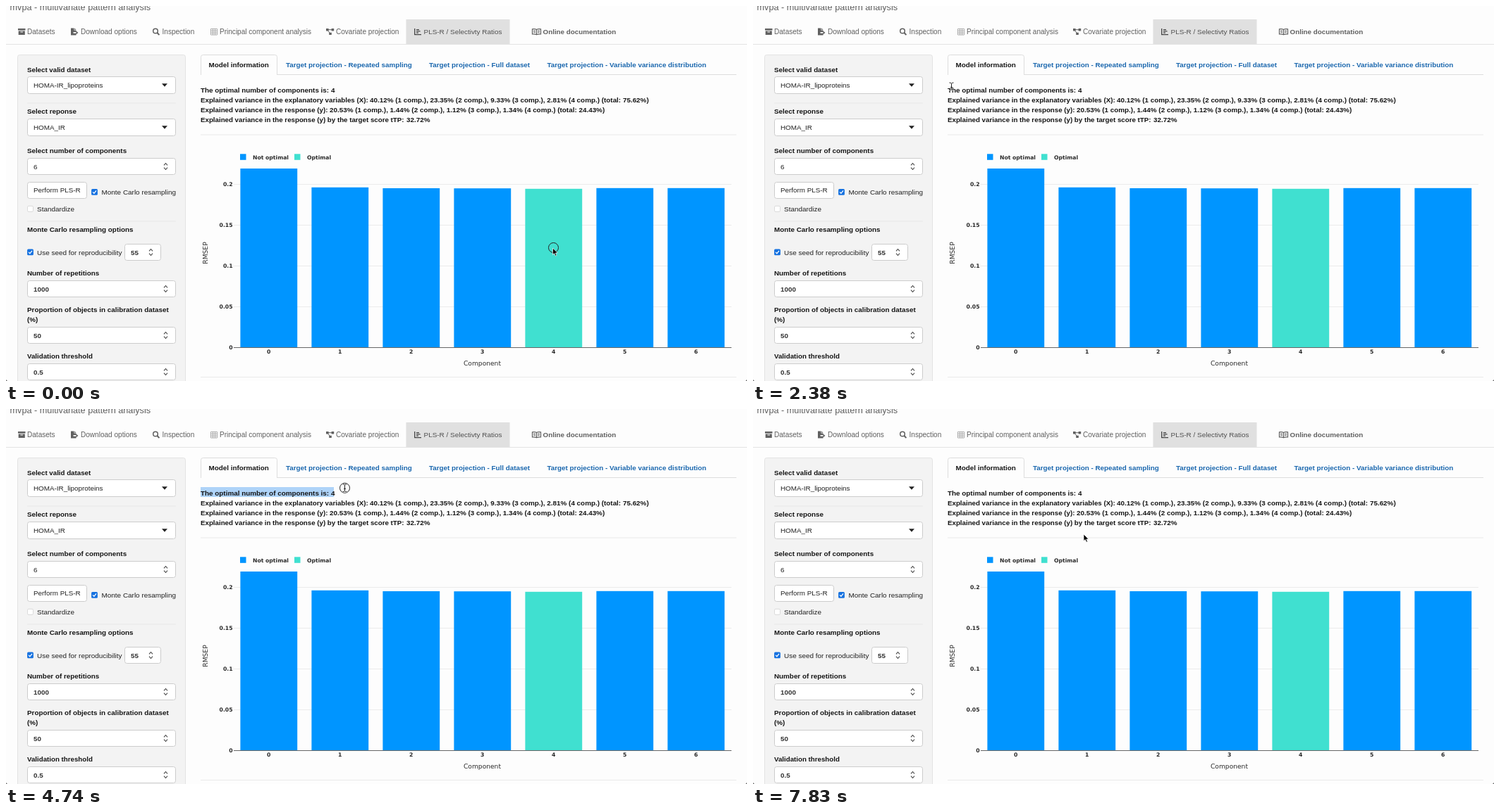
These frames come from a looping animation (1051 by 533 pixels, 8000 ms). An HTML page:

```html
<!DOCTYPE html>
<html lang="en">
<head>
<meta charset="utf-8">
<title>Pattern analysis</title>
<style>
html, body { margin: 0; width: 100%; height: 100%; overflow: hidden; background: #fdfdfd; }
svg { display: block; width: 100%; height: 100%; }
text { font-family: "Liberation Sans", Arial, sans-serif; font-size: 9.85px; fill: #222; white-space: pre; }
.b { font-weight: bold; fill: #161616; }
.value { font-weight: bold; fill: #333; }
.words { font-size: 9.72px; }
.figures { font-size: 9.9px; }
.wide { font-size: 9.95px; }
.nav { font-size: 10.05px; fill: #606060; }
.link { font-weight: bold; fill: #1a67ae; }
.plot { font-family: "DejaVu Sans", sans-serif; font-size: 7.7px; font-weight: bold; fill: #2a2a2a; }
.axis { font-family: "DejaVu Sans", sans-serif; font-size: 9.15px; fill: #2a2a2a; }
.icon { fill: #606060; stroke: none; }
.line { fill: none; stroke: #606060; stroke-width: 1; }
</style>
</head>
<body>
<svg viewBox="0 0 1051 533" xmlns="http://www.w3.org/2000/svg">
  <g id="page"></g>
  <rect id="mark" x="276" y="111" height="14" fill="#aed3f8"/>
  <g id="info"></g>
  <g id="pointer">
    <circle id="ring" r="7" fill="none" stroke="#222" stroke-width="1"/>
    <path id="arrow" d="M0 0V9.6L2.2 7.6L3.8 11.2L5.5 10.4L3.9 7H7Z" fill="#000" stroke="#fff" stroke-width=".7" stroke-linejoin="round"/>
    <g id="beam" fill="none">
      <path d="M-3-5.5Q0-5.5 0-4Q0-5.5 3-5.5M0-4V4M-3 5.5Q0 5.5 0 4Q0 5.5 3 5.5M-1.5 1H1.5" stroke="#fff" stroke-width="2"/>
      <path d="M-3-5.5Q0-5.5 0-4Q0-5.5 3-5.5M0-4V4M-3 5.5Q0 5.5 0 4Q0 5.5 3 5.5M-1.5 1H1.5" stroke="#222" stroke-width="1"/>
    </g>
  </g>
</svg>
<script>
const el = id => document.getElementById(id);
const text = (x, y, s, cls = "", more = "") => `<text x="${x}" y="${y}" class="${cls}" ${more}>${s}</text>`;
const rect = (x, y, w, h, fill, more = "") => `<rect x="${x}" y="${y}" width="${w}" height="${h}" fill="${fill}" ${more}/>`;
const path = (d, cls = "icon", more = "") => `<path d="${d}" class="${cls}" ${more}/>`;
const rule = (x, y, x2, color) => rect(x, y, x2 - x, 1, color);

const box = (x, y, w, h) => rect(x + .5, y + .5, w - 1, h - 1, "#fff", 'rx="3" stroke="#ccc"');
const spin = (x, y) => `<path d="M${x - 2.5} ${y - 1.7}l2.5-2.8l2.5 2.8M${x - 2.5} ${y + 1.7}l2.5 2.8l2.5-2.8" fill="none" stroke="#444" stroke-width="1.1"/>`;
const check = (x, y, on) => on
  ? rect(x - 4.4, y - 4.4, 8.8, 8.8, "#1672e0", 'rx="1.5"') +
    `<path d="M${x - 2.4} ${y + .1}l1.8 1.9l3.1-4" fill="none" stroke="#fff" stroke-width="1.3"/>`
  : rect(x - 4, y - 4, 8, 8, "#fff", 'rx="1.5" stroke="#d2d2d2" stroke-width=".8"');
const select = (y, s) => box(30, y, 211, 25) + text(39, y + 15.6, s) +
  path(`M221 ${y + 10.3}h8l-4 4.4z`, "", 'fill="#222"');
const number = (y, s, cls = "value", x = 30, w = 211) =>
  box(x, y, w, 24) + text(x + 9, y + 15.5, s, cls) + spin(x + w - 14.5, y + 12);

function navBar() {
  let s = text(5.5, 5.7, "mvpa - multivariate pattern analysis", "nav", 'style="font-size:12.7px"');
  s += rule(0, 54, 1051, "#e4e4e4") + rect(567.5, 19, 147, 35, "#e0e0e0");
  [[30, "Datasets"], [106, "Download options"], [221.5, "Inspection"],
   [303, "Principal component analysis"], [468, "Covariate projection"]]
    .forEach(([x, label]) => s += text(x, 40.3, label, "nav"));
  s += text(592.5, 40.3, "PLS-R / Selectivty Ratios", "wide", 'style="fill:#505050"');
  s += text(761.5, 40.3, "Online documentation", "nav", 'style="font-weight:bold;font-size:9.83px"');
  // archive
  s += path("M17 32h10.5v2.6H17zM17.7 35.4h9.1v5.6h-9.1zM20.5 36.4v1h3.5v-1z", "icon", 'fill-rule="evenodd"');
  // file with arrow
  s += path("M92 31.5h4.5v3h3V37h-4v1.8h4V41.5H92zM97.2 31.5l2.3 2.3h-2.3zM99.5 35.6l3 2.3l-3 2.3z");
  // magnifier
  s += `<circle cx="212" cy="35.5" r="3.3" class="line" style="stroke-width:1.5"/>` +
    path("M214.4 38l3 3.2", "line", 'style="stroke-width:1.9"');
  // table
  s += path("M290.5 32.5h9v8.5h-9zM290.5 35.3h9M290.5 38.2h9M293.5 32.5v8.5M296.5 32.5v8.5", "line", 'style="stroke:#999;stroke-width:.8"');
  // linked nodes
  s += path("M454 32h3.6v3.4H454zM461.6 32h3.6v3.4h-3.6zM458.2 37.7h3.6v3.4h-3.6z") + path("M457 33.7h5M456.4 34.6l3 4", "line");
  // bar chart
  s += path("M579.7 32v8.7h9.3", "line", 'style="stroke:#444;stroke-width:1.3"') +
    path("M582 33.6h4M582 35.9h5.6M582 38.2h3", "line", 'style="stroke:#444;stroke-width:1.2"');
  // open book
  s += path("M746.5 32.8q3.5-.8 6 .8q2.5-1.6 6-.8v7.2q-3.5-.6-6 .8q-2.5-1.4-6-.8zM752.5 33.6v7.2", "line", 'style="stroke-width:1.2"') +
    path("M748 35l3 .6M748 37l3 .6M757 35l-3 .6M757 37l-3 .6", "line");
  return s;
}

function sideBar() {
  let s = rect(16.5, 69.5, 238, 480, "#f3f3f3", 'rx="3" stroke="#e3e3e3"');
  [[93.5, "Select valid dataset", "words"], [153, "Select reponse"], [208.7, "Select number of components"],
   [320.5, "Monte Carlo resampling options"], [383, "Number of repetitions"],
   [435.2, "Proportion of objects in calibration dataset"], [449, "(%)"], [501, "Validation threshold", "words"]]
    .forEach(([y, label, size = ""]) => s += text(30, y, label, "b " + size));
  s += rule(30, 137.5, 241, "#e8e8e8") + rule(30, 305.5, 241, "#e8e8e8");
  s += select(100, "HOMA-IR_lipoproteins") + select(160, "HOMA_IR");
  s += number(216, "6", "") + number(338, "55", "value", 168, 52);
  s += number(390, "1000") + number(456, "50") + number(508, "0.5");
  s += box(30, 250, 85, 24) + text(39, 265.3, "Perform PLS-R");
  s += check(125.5, 264.3, true) + text(135.5, 268, "Monte Carlo resampling", "wide");
  s += check(34.5, 288.3, false) + text(44, 291.6, "Standardize", "wide");
  s += check(34.5, 349.8, true) + text(44, 353.5, "Use seed for reproducibility", "wide");
  return s;
}

function tabs() {
  return rule(276, 97, 1036, "#ddd") +
    `<path d="M276.5 98.5V72.5q0-3 3-3h102q3 0 3 3V98.5" fill="#fdfdfd" stroke="#ddd"/>` +
    rect(277, 97, 107, 2, "#fdfdfd") + rect(276, 98, 1, 1, "#fdfdfd") + rect(384, 98, 1, 1, "#fdfdfd") +
    text(287.5, 87.2, "Model information", "b") +
    text(397, 87.2, "Target projection - Repeated sampling", "link") +
    text(600, 87.2, "Target projection - Full dataset", "link") +
    text(767.5, 87.2, "Target projection - Variable variance distribution", "link") +
    rule(276, 182.5, 1036, "#eaeaea") + rule(276, 527, 1036, "#eaeaea");
}

function chart() {
  const blue = "#0095ff", teal = "#40e0d0";
  const tops = [231, 257.8, 259, 259.2, 259.8, 258.8, 258.8];
  let s = rect(332, 210.3, 8.5, 8.5, blue) + text(350, 217.6, "Not optimal", "plot") +
    rect(409, 210.3, 8.5, 8.5, teal) + text(427, 217.6, "Optimal", "plot");
  ["0", "0.05", "0.1", "0.15", "0.2"].forEach((label, i) => {
    const y = 485 - i * 58;
    s += text(321.5, y + 3.3, label, "plot", 'text-anchor="end"');
    if (i) s += rule(323, y, 1029, "#ececec");
  });
  tops.forEach((y, i) => {
    const x = 332.4 + i * 101;
    s += rect(x, y, 80.8, 485.3 - y, i === 4 ? teal : blue) +
      text(x + 40.4, 494, i, "plot", 'text-anchor="middle"');
  });
  return s + rule(323, 485, 1029, "#666") +
    text(675.5, 511.3, "Component", "axis", 'text-anchor="middle"') +
    text(0, 0, "RMSEP", "axis", 'text-anchor="middle" transform="translate(286 351) rotate(-90)"');
}

el("page").innerHTML = navBar() + sideBar() + tabs() + chart() +
  path("M0 530.5Q.3 532.7 2.5 533H0zM1051 530.5Q1050.7 532.7 1048.5 533H1051z", "", 'fill="#555"');

// Each summary line: words, then figures starting at their own column.
el("info").innerHTML = text(276, 123, "The optimal number of components is: 4", "b figures") + [
  ["explanatory variables (X):", 516, "40.12% (1 comp.), 23.35% (2 comp.), 9.33% (3 comp.), 2.81% (4 comp.) (total: 75.62%)"],
  ["response (y):", 459, "20.53% (1 comp.), 1.44% (2 comp.), 1.12% (3 comp.), 1.34% (4 comp.) (total: 24.43%)"],
  ["response (y) by the target score tTP:", 568, "32.72%"]
].map(([words, x, figures], i) => {
  const y = 137 + i * 14;
  return text(276, y, "Explained variance in the " + words, "b words") + text(x, y, figures, "b figures");
}).join("");

// Pointer stops: step, x, y. Between stops the pointer moves evenly, one jump per step.
const LOOP = 8000, STEP = 147.5;
const stops = [
  [0, 775.5, 344], [1, 710, 238], [2, 573, 213], [3, 536, 197], [4, 531, 193], [9, 531, 193],
  [10, 486, 153], [11, 390, 126], [12, 300, 113], [13, 268, 111], [15, 275, 113], [17, 288, 116],
  [18, 288, 116], [20, 303, 119], [22, 284, 117], [23, 279.5, 116.7], [26, 281, 116.7],
  [27, 281, 116.7], [29, 345, 110], [30, 405, 105], [31, 452, 108], [32, 480.5, 112.3], [38, 480.5, 112.3],
  [39, 479, 113], [40, 560, 130], [41, 740, 158], [42, 849, 170], [43, 760, 160], [44, 570, 147], [45, 385, 134],
  [46, 272, 123.5], [48, 310, 138], [50, 395, 160], [52, 455, 175], [53, 469, 178]
];
const within = (k, a, b) => k >= a && k <= b;

function place(k) {
  const i = stops.findIndex(s => s[0] >= k);
  if (i < 0) return stops[stops.length - 1].slice(1);
  if (i === 0) return stops[0].slice(1);
  const [a, ax, ay] = stops[i - 1], [b, bx, by] = stops[i];
  const f = (k - a) / (b - a);
  return [ax + (bx - ax) * f, ay + (by - ay) * f];
}

function draw(time) {
  const k = Math.max(0, Math.floor((time % LOOP - 2) / STEP));
  const [x, y] = place(k);
  const beam = within(k, 16, 38);
  const pressed = k === 0 || within(k, 27, 34) || k === 38;
  el("pointer").setAttribute("transform", `translate(${x} ${y})`);
  el("beam").style.display = beam ? "" : "none";
  el("arrow").style.display = beam ? "none" : "";
  el("ring").style.display = pressed ? "" : "none";
  el("ring").setAttribute("cx", beam ? 0 : 1);
  el("ring").setAttribute("cy", beam ? 0 : -.5);
  el("mark").setAttribute("width", within(k, 28, 37) ? Math.max(0, Math.min(x, 465) - 276) : 0);
}

const start = performance.now();
function tick() {
  draw(performance.now() - start);
  requestAnimationFrame(tick);
}
tick();
</script>
</body>
</html>
```
